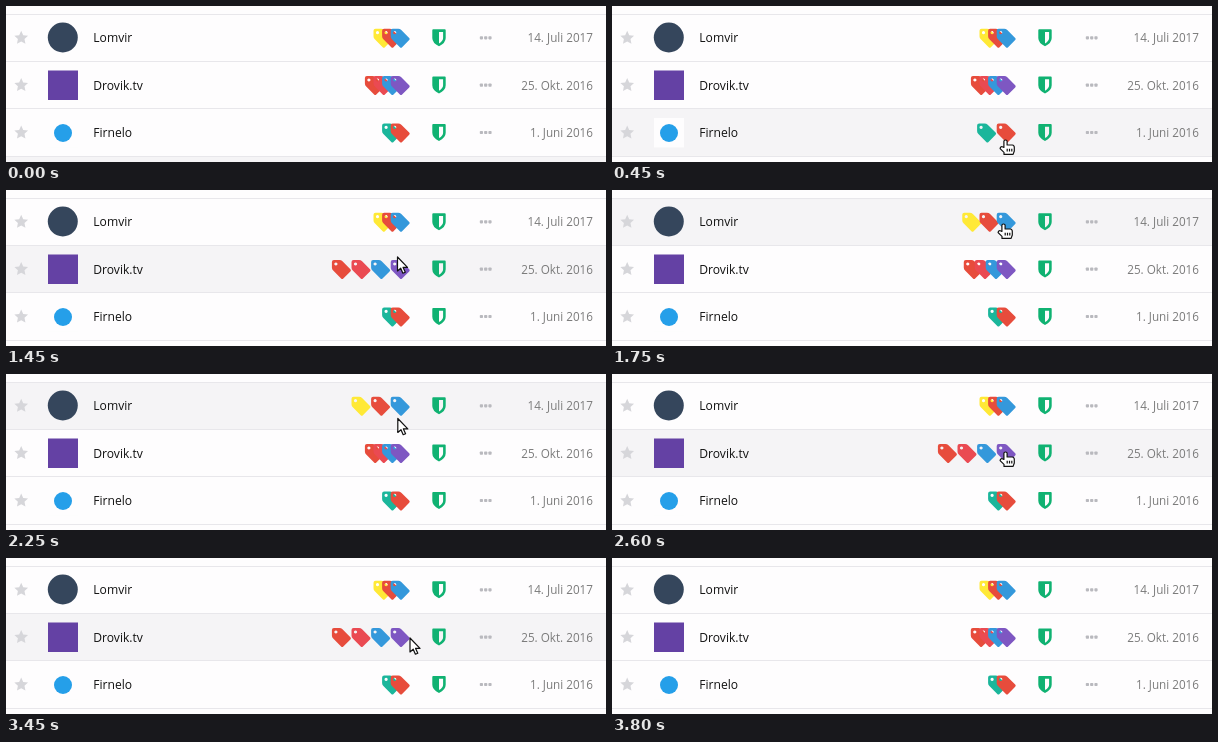
An HTML page for the animation above (5000 ms loop, 600 by 156 pixels).

```html
<!DOCTYPE html>
<html lang="de">
<head>
<meta charset="utf-8">
<title>Account list</title>
<style>
  html, body { margin: 0; width: 100%; height: 100%; overflow: hidden; background: #fefdfe; }
  svg { display: block; width: 600px; height: 156px; }
  text { font-family: "Open Sans", "Noto Sans", sans-serif; }
  .name { font-size: 12.1px; fill: #111; }
  .date { font-size: 11.7px; fill: #7b7b7b; text-anchor: end; }
  .hover { fill: #f5f4f6; }
  .line { fill: #e8e7eb; }
  .star { fill: #d6d6da; }
  .shield { fill: #10b272; fill-rule: evenodd; }
  .dots { fill: #b9b9be; }
  .tag { fill-rule: evenodd; }
  .cursor path { fill: #fff; stroke: #111; stroke-width: 1.2; stroke-linejoin: round; }
</style>
</head>
<body>
<svg id="stage" viewBox="0 0 600 156"></svg>
<script>
const LOOP = 5000, TICK = 50, FADE = 300;
const TAG_RIGHT = 384.7, TIGHT = 8.6, WIDE = 19.6;
const RED = '#e74c3c', BLUE = '#3498db';

const rows = [
  { y: 32, name: 'Lomvir', date: '14. Juli 2017', tags: ['#ffe936', RED, BLUE] },
  { y: 79.3, name: 'Drovik.tv', date: '25. Okt. 2016', tags: [RED, '#ea4a52', BLUE, '#7e57c2'] },
  { y: 126.7, name: 'Firnelo', date: '1. Juni 2016', tags: ['#1bb69b', RED] }
];
const edges = [8, 55, 102.5, 150];

// time, hovered row
const hovers = [[0, 3], [150, 2], [930, 1], [1540, 0], [2300, 1], [3510, -1]];

// time, x, y of the pointer tip
const path = [
  [150, 400, 149], [450, 393.5, 134], [600, 393.5, 132], [800, 393.5, 132],
  [1050, 391, 84], [1250, 391.5, 78], [1350, 391.5, 78], [1750, 391.5, 34],
  [1850, 391.5, 33], [2200, 391.5, 33], [2300, 392, 56], [2450, 393, 74],
  [2600, 393.5, 78], [3400, 393.5, 78], [3450, 404, 80], [3549, 404, 80]
];

const TAG = 'M2 0H7.5Q9.3 0 10.6 1.3L18.5 9.2Q19.6 10.3 18.5 11.4L11.4 18.5Q10.3 19.6 9.2 18.5' +
  'L1.3 10.6Q0 9.3 0 7.5V2Q0 0 2 0ZM4 2.4a1.6 1.6 0 1 0 .01 0Z';
const SHIELD = 'M-5.8 -8.7H5.8Q6.7 -8.7 6.7 -7.8V0Q6.7 5 0 8.3Q-6.7 5 -6.7 0V-7.8Q-6.7 -8.7 -5.8 -8.7Z' +
  'M0 -6H4.1V0Q4.1 3 0 5.4Z';
const HAND = 'M-1.6 7.5V1.2Q-1.6 0 0 0Q1.6 0 1.6 1.2V5H6.8Q8.8 5.2 8.8 7.4V11L7.6 14.4H-1.5V12.4' +
  'L-5.4 8.6Q-5 6.2 -3.2 6.8ZM1.7 8.8V11.6M4 8.8V11.6M6.3 8.8V11.6';
const ARROW = 'M0 0V14L3.2 11.2L5.4 16.2L7.8 15.2L5.6 10.4H10Z';

const stage = document.getElementById('stage');

function add(parent, tag, attrs, text) {
  const el = document.createElementNS('http://www.w3.org/2000/svg', tag);
  for (const key in attrs) el.setAttribute(key, attrs[key]);
  if (text) el.textContent = text;
  return parent.appendChild(el);
}

function starPath(r) {
  let d = '';
  for (let i = 0; i < 10; i++) {
    const a = -Math.PI / 2 + i * Math.PI / 5, k = i % 2 ? r * 0.48 : r;
    d += (i ? 'L' : 'M') + (k * Math.cos(a)).toFixed(2) + ' ' + (k * Math.sin(a)).toFixed(2);
  }
  return d + 'Z';
}

const shades = edges.map(y => add(stage, 'rect', { class: 'hover', y, width: 600, height: 47.4 }));
edges.forEach(y => add(stage, 'rect', { class: 'line', y: Math.floor(y), width: 600, height: 1 }));

add(stage, 'circle', { cx: 56.8, cy: 31.5, r: 15, fill: '#35465c' });
add(stage, 'rect', { x: 42, y: 64.5, width: 30, height: 29.5, fill: '#6441a4' });
add(stage, 'rect', { x: 42, y: 112, width: 30, height: 29.5, fill: '#fefdfe' });
add(stage, 'circle', { cx: 57, cy: 127, r: 9, fill: '#259fe9' });

for (const row of rows) {
  const g = add(stage, 'g', { transform: `translate(0 ${row.y})` });
  add(g, 'path', { class: 'star', d: starPath(7.2), transform: 'translate(15.2 0)' });
  add(g, 'text', { class: 'name', x: 87.3, y: 4.2 }, row.name);
  row.els = row.tags.map(fill => add(g, 'path', { class: 'tag', d: TAG, fill }));
  add(g, 'path', { class: 'shield', d: SHIELD, transform: 'translate(433 0)' });
  for (let i = 0; i < 3; i++)
    add(g, 'rect', { class: 'dots', x: 473.8 + i * 4.3, y: -1.8, width: 3.2, height: 3.2, rx: 0.8 });
  add(g, 'text', { class: 'date', x: 587, y: 4.2 }, row.date);
}

const cursor = add(stage, 'g', { class: 'cursor' });
const pointer = add(cursor, 'path', {});

const ease = k => {
  k = Math.min(1, Math.max(0, k));
  return k * k * (3 - 2 * k);
};

function spread(index, t) {
  let s = 0;
  for (const [start, row] of hovers)
    s += ((row === index ? 1 : 0) - s) * ease((t - start) / FADE);
  return s;
}

function tipAt(t) {
  const i = path.findIndex(p => p[0] > t);
  if (i < 1) return null;
  const [t0, x0, y0] = path[i - 1], [t1, x1, y1] = path[i];
  const k = (t - t0) / (t1 - t0);
  return [x0 + (x1 - x0) * k, y0 + (y1 - y0) * k];
}

function draw(t) {
  const hovered = hovers.filter(h => h[0] <= t).pop()[1];
  shades.forEach((el, i) => { el.style.display = i === hovered ? '' : 'none'; });

  rows.forEach((row, i) => {
    const gap = TIGHT + (WIDE - TIGHT) * spread(i, t);
    row.els.forEach((el, n) => {
      const x = TAG_RIGHT - (row.els.length - 1 - n) * gap;
      el.setAttribute('transform', `translate(${x.toFixed(2)} -9.3)`);
    });
  });

  const tip = tipAt(t);
  cursor.style.display = tip ? '' : 'none';
  if (!tip) return;
  const [x, y] = tip;
  const onTag = x < 403 && rows.some(row => Math.abs(y - row.y) <= 10);
  pointer.setAttribute('d', onTag ? HAND : ARROW);
  cursor.setAttribute('transform', `translate(${x.toFixed(1)} ${y.toFixed(1)})`);
}

const begin = performance.now();
function frame() {
  const t = (performance.now() - begin) % LOOP;
  draw(Math.floor(t / TICK) * TICK);
  requestAnimationFrame(frame);
}
frame();
</script>
</body>
</html>
```
